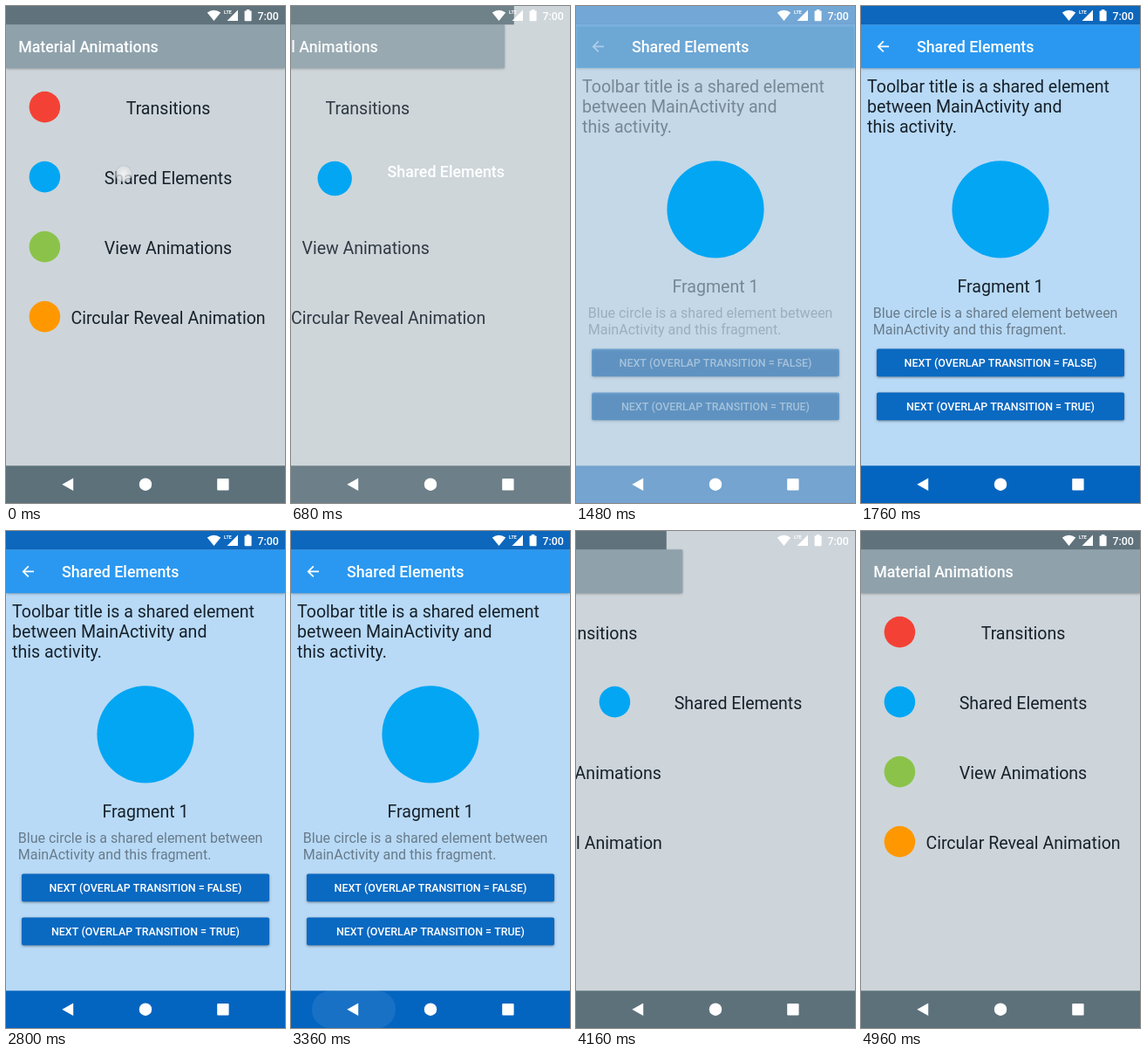
An HTML page with a canvas that plays this animation: 320 by 569 pixels, repeating every 5000 ms.

```html
<!DOCTYPE html>
<html lang="en">
<head>
<meta charset="utf-8">
<title>Material Animations</title>
<style>
  html, body { margin: 0; width: 100%; height: 100%; overflow: hidden; background: #cdd5da; }
  canvas { display: block; width: 320px; height: 569px; }
</style>
</head>
<body>
<canvas id="stage"></canvas>
<script>
const W = 320, H = 569, LOOP = 5000, STEP = 134.05;
const BAR = 21.3, TOOLBAR = 71.1, NAV = 526.3;
const INK = '#17212b', PAPER = '#cdd5da';
const canvas = document.getElementById('stage');
const ctx = canvas.getContext('2d');
const dpr = window.devicePixelRatio || 1;
canvas.width = W * dpr;
canvas.height = H * dpr;

const rows = [
  { label: 'Transitions', color: '#f34235', delay: 3 },
  { label: 'Shared Elements', color: '#03a6f3', shared: true },
  { label: 'View Animations', color: '#8bc34a', delay: 0 },
  { label: 'Circular Reveal Animation', color: '#ff9800', delay: 39 }
];
const rowY = i => 115.6 + 80 * i;

// Timing
const span = (t, a, b) => Math.min(1, Math.max(0, (t - a) / (b - a)));
const smooth = u => 0.5 - Math.cos(Math.PI * u) / 2;
const mix = (a, b, p) => a + (b - a) * p;

function fastOutSlowIn(u) {
  let lo = 0, hi = 1, s = 0.5;
  for (let i = 0; i < 20; i++) {
    const x = 1.2 * s * (1 - s) ** 2 + 0.6 * s * s * (1 - s) + s ** 3;
    if (x < u) lo = s; else hi = s;
    s = (lo + hi) / 2;
  }
  return 3 * s * s * (1 - s) + s ** 3;
}

function recordedTime(ms) {
  const k = Math.floor((Math.floor(ms / 40) + 0.5) * 40 / STEP);
  return Math.round(k * STEP / 40) * 40;
}

// Accelerates out to the left, later decelerates back in
function slide(t, delay) {
  return t < 2000
    ? -W * span(t, 400 + delay, 900 + delay) ** 2
    : -W * (1 - span(t, 4015 + delay, 4515 + delay)) ** 2;
}

// Drawing
function rect(x, y, w, h, color) {
  ctx.fillStyle = color;
  ctx.fillRect(x, y, w, h);
}

function disc(x, y, r, color) {
  ctx.fillStyle = color;
  ctx.beginPath();
  ctx.arc(x, y, r, 0, 7);
  ctx.fill();
}

function pill(x, y, w, h, r, color) {
  ctx.fillStyle = color;
  ctx.beginPath();
  ctx.roundRect(x, y, w, h, r);
  ctx.fill();
}

function poly(color, ...points) {
  ctx.fillStyle = color;
  ctx.beginPath();
  points.forEach(([x, y]) => ctx.lineTo(x, y));
  ctx.fill();
}

function text(str, x, y, size, color, weight = 400, align = 'left') {
  ctx.font = `${weight} ${size}px Roboto, sans-serif`;
  ctx.textAlign = align;
  ctx.fillStyle = color;
  ctx.fillText(str, x, y);
}

function group(alpha, dx, draw) {
  if (alpha <= 0) return;
  ctx.save();
  ctx.globalAlpha = alpha;
  ctx.translate(dx, 0);
  draw();
  ctx.restore();
}

function shadow(blur, draw) {
  ctx.save();
  ctx.shadowColor = 'rgba(0,0,0,.4)';
  ctx.shadowBlur = blur * dpr;
  ctx.shadowOffsetY = dpr;
  draw();
  ctx.restore();
}

const toolbar = color => shadow(3, () => rect(0, BAR, W, TOOLBAR - BAR, color));

function mainScreen(t, hideShared) {
  group(1, slide(t, 38), () => {
    toolbar('#8fa2ac');
    text('Material Animations', 14.2, 53.2, 17.78, '#fff', 500);
  });
  group(1, slide(t, 56), () => rect(0, 0, W, BAR, '#60737d'));
  rows.forEach((row, i) => {
    if (row.shared && hideShared) return;
    group(1, row.shared ? 0 : slide(t, 15), () => disc(44.4, rowY(i), 17.8, row.color));
    group(1, row.shared ? 0 : slide(t, row.delay), () =>
      text(row.label, 186, rowY(i) + 7.9, 19.56, INK, 400, 'center'));
  });
  rect(0, NAV, W, H - NAV, '#5d717b');
}

function button(label, y) {
  shadow(3, () => pill(18, y, 284, 31.7, 2, '#0a69c1'));
  text(label, 160, y + 20.7, 12.44, '#fff', 500, 'center');
}

function backArrow() {
  ctx.strokeStyle = '#fff';
  ctx.lineWidth = 1.8;
  ctx.beginPath();
  ctx.moveTo(32, 46.4);
  ctx.lineTo(20, 46.4);
  ctx.moveTo(25.8, 40.4);
  ctx.lineTo(19.8, 46.4);
  ctx.lineTo(25.8, 52.4);
  ctx.stroke();
}

function detailScreen() {
  rect(0, 0, W, NAV, '#b8daf6');
  toolbar('#2a98f0');
  rect(0, 0, W, BAR, '#0c67bd');
  backArrow();
  ['Toolbar title is a shared element', 'between MainActivity and', 'this activity.']
    .forEach((line, i) => text(line, 7.1, 99.3 + 22.9 * i, 19.56, INK));
  text('Fragment 1', 160, 327.6, 19.56, INK, 400, 'center');
  ['Blue circle is a shared element between', 'MainActivity and this fragment.']
    .forEach((line, i) => text(line, 13.8, 357 + 18.75 * i, 16, '#687b8b'));
  button('NEXT (OVERLAP TRANSITION = FALSE)', 392.5);
  button('NEXT (OVERLAP TRANSITION = TRUE)', 442.5);
}

function systemIcons() {
  ctx.fillStyle = '#fff';
  ctx.beginPath();
  ctx.moveTo(238.5, 17);
  ctx.lineTo(230.8, 7.6);
  ctx.quadraticCurveTo(238.5, 1.8, 246.2, 7.6);
  ctx.fill();
  poly('#fff', [266, 4.5], [266, 17], [253.5, 17]);
  text('LTE', 250, 9, 5.4, '#fff', 700);
  pill(273.6, 5.4, 8, 11.8, 0.8, '#fff');
  rect(275.8, 4, 3.6, 2, '#fff');
  text('7:00', 288.4, 15.5, 12.44, '#fff', 500);

  poly('#fff', [64.3, 547.7], [77.2, 540.4], [77.2, 555]);
  disc(160, 547.7, 7.2, '#fff');
  pill(242.2, 541, 13.4, 13.4, 1, '#fff');
}

function touchDot(x, y) {
  const glow = ctx.createRadialGradient(x, y, 1, x, y, 10);
  glow.addColorStop(0, 'rgba(245,245,245,.85)');
  glow.addColorStop(0.8, 'rgba(225,228,230,.7)');
  glow.addColorStop(1, 'rgba(160,170,176,.45)');
  disc(x, y, 9.8, glow);
}

function draw(t) {
  const inFlight = t >= 640 && t < 3960;
  const cover = t < 2000 ? span(t, 640, 940) : 1 - span(t, 3620, 3640);
  const content = smooth(t < 2500 ? span(t, 1250, 1750) : 1 - span(t, 3485, 3785));
  const blueNav = t < 2500 ? content : 1 - span(t, 3640, 3860);
  const move = fastOutSlowIn(t < 2000 ? span(t, 640, 940) : 1 - span(t, 3485, 3785));

  ctx.setTransform(dpr, 0, 0, dpr, 0, 0);
  rect(0, 0, W, H, PAPER);
  mainScreen(t, inFlight);
  group(cover, 0, () => rect(0, 0, W, H, PAPER));
  group(content, 0, detailScreen);
  group(blueNav, 0, () => rect(0, NAV, W, H - NAV, '#0465c0'));

  const ripple = span(t, 3050, 3300);
  group(0.08 * ripple * (1 - span(t, 3620, 3820)), 0, () => {
    const half = mix(20, 48, ripple);
    pill(72 - half, NAV, 2 * half, H - NAV, 21, '#fff');
  });

  if (inFlight) {
    disc(mix(44.4, 160, move), mix(rowY(1), 232.8, move), mix(17.8, 55.6, move), '#03a6f3');
    text('Shared Elements', mix(113, 64, move), mix(204, 53.2, move), 17.78, '#fff', 500);
  }
  if (t < 200) touchDot(135, 192);
  systemIcons();
}

const start = performance.now();
function tick() {
  draw(recordedTime((performance.now() - start) % LOOP));
  requestAnimationFrame(tick);
}
tick();
</script>
</body>
</html>
```
